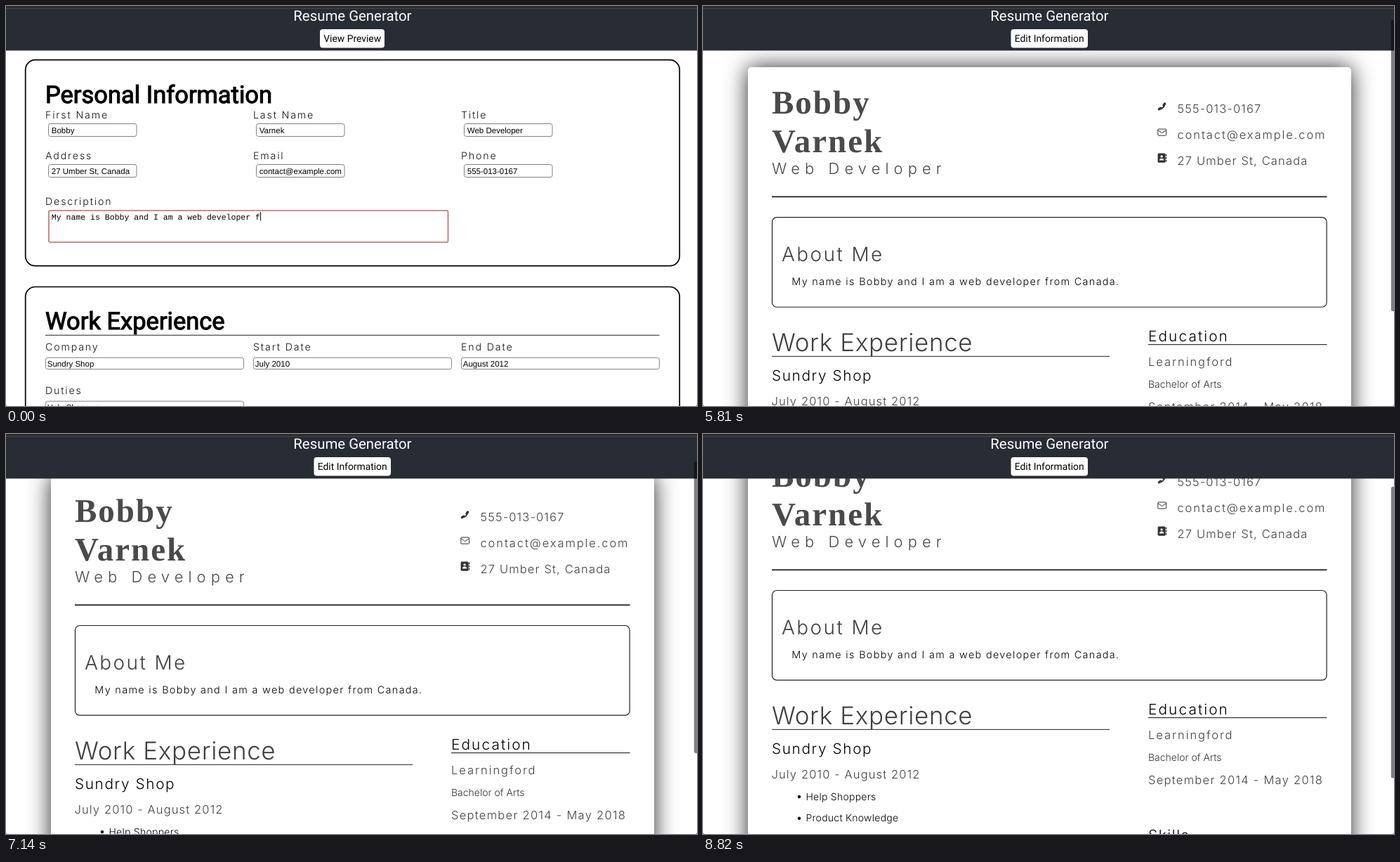
An HTML page that plays this animation: 984 by 569 pixels, repeating every 8.89 s.

```html
<!DOCTYPE html>
<html lang="en">
<head>
<meta charset="utf-8">
<title>Resume Generator</title>
<style>
html, body { margin: 0; width: 100%; height: 100%; overflow: hidden; background: #fff; }
#stage { position: fixed; inset: 0; overflow: hidden; contain: strict; }
#sheet {
  position: absolute; left: 63.5px; top: 89.5px; width: 859.5px; height: 640px;
  border-radius: 5px; background: #fff; box-shadow: 0 0 32px rgba(0, 0, 0, .85);
}
svg { position: absolute; left: 0; top: 0; width: 984px; height: 569px; overflow: hidden; }
text { text-rendering: geometricPrecision; font-family: Inter, "Open Sans", sans-serif; white-space: pre; }
.bar { font-family: Roboto, sans-serif; text-anchor: middle; }
.head { font: 34.5px Roboto, sans-serif; stroke: #000; stroke-width: 1.1px; }
.label { font-size: 14.2px; font-weight: 350; letter-spacing: 1.85px; fill: #111; }
.value { font: 11.5px "Liberation Sans", Arial, sans-serif; }
.mono { font: 11.53px "Liberation Mono", "Courier New", monospace; }
.name { font: bold 47px "Liberation Serif", serif; letter-spacing: 2px; fill: #4a4a4a; }
.job { font-size: 22px; font-weight: 300; fill: #484848; }
.light { font-size: 16.5px; font-weight: 300; fill: #404040; }
.about { font-size: 28px; font-weight: 300; fill: #404040; }
.big { font-size: 35px; font-weight: 300; fill: #404040; }
.sub { font-size: 20.8px; font-weight: 350; }
.body { font-size: 14.4px; font-weight: 350; }
.small { font-size: 14px; font-weight: 350; }
.dim { font-size: 14px; font-weight: 300; fill: #303030; }
</style>
</head>
<body>
<div id="stage">
  <div id="sheet"></div>
  <svg viewBox="0 0 984 569">
    <g id="form"></g>
    <g id="resume"></g>
    <g id="top"></g>
  </svg>
</div>
<script>
const $ = id => document.getElementById(id);
const form = $('form'), resume = $('resume'), bar = $('top'), sheet = $('sheet');

function add(parent, tag, attrs) {
  const el = document.createElementNS('http://www.w3.org/2000/svg', tag);
  for (const k in attrs) el.setAttribute(k, attrs[k]);
  return parent.appendChild(el);
}
function text(parent, cls, x, y, str, spacing) {
  const el = add(parent, 'text', { class: cls, x, y });
  if (spacing) el.style.letterSpacing = spacing + 'px';
  el.textContent = str;
  return el;
}
function box(parent, x, y, width, height, rx, stroke, weight = 1, fill = 'none') {
  return add(parent, 'rect', { x, y, width, height, rx, stroke, 'stroke-width': weight, fill });
}
function rule(parent, x, y, width, height, fill) {
  return add(parent, 'rect', { x, y, width, height, fill });
}

const LOOP = 8890, STEP = 70, SWITCH = 3990, BLUR = 3850;
const COLS = [56, 352, 648], GREY = '#808080';
const BIO = 'My name is Bobby and I am a web developer from Canada.';
const PHONE = '555-013-0167', EMAIL = 'contact@example.com', ADDRESS = '27 Umber St, Canada';

// Edit form
function field(col, y, label, value) {
  text(form, 'label', COLS[col], y, label);
  box(form, COLS[col] + 4.5, y + 8, 125.5, 18, 3, GREY);
  text(form, 'value', COLS[col] + 8.8, y + 21, value);
}
function wideField(col, y, label, value) {
  text(form, 'label', COLS[col], y, label);
  box(form, COLS[col] + .4, y + 10.7, 282, 16.4, 3, GREY);
  text(form, 'value', COLS[col] + 2.8, y + 23, value);
}
box(form, 27.7, 76.7, 931.5, 293, 14, '#000', 1.7);
box(form, 27.7, 399.5, 931.5, 400, 14, '#000', 1.7);
text(form, 'head', 56, 137.5, 'Personal Information');
field(0, 159.5, 'First Name', 'Bobby');
field(1, 159.5, 'Last Name', 'Varnek');
field(2, 159.5, 'Title', 'Web Developer');
field(0, 217.5, 'Address', ADDRESS);
field(1, 217.5, 'Email', EMAIL);
field(2, 217.5, 'Phone', PHONE);
text(form, 'label', 56, 282.5, 'Description');
const ring = box(form, 61, 291, 568.5, 45, 2, '#c46a68', 1.6);
const typed = text(form, 'mono', 64.8, 303.7, '');
const caret = rule(form, 0, 293, 1, 12.5, '#000');
text(form, 'head', 56, 460, 'Work Experience');
rule(form, 56, 467.7, 874.5, 1.3, '#555');
wideField(0, 489.5, 'Company', 'Sundry Shop');
wideField(1, 489.5, 'Start Date', 'July 2010');
wideField(2, 489.5, 'End Date', 'August 2012');
wideField(0, 551.5, 'Duties', 'Help Shoppers');

// Resume preview
text(resume, 'name', 98, 155.5, 'Bobby');
text(resume, 'name', 98, 211, 'Varnek');
text(resume, 'job', 98, 241.5, 'Web Developer', 7.05);
text(resume, 'light', 675.5, 154.5, PHONE, 1.15);
text(resume, 'light', 675.5, 191.5, EMAIL, 1.9);
text(resume, 'light', 675.5, 228.5, ADDRESS, 1.15);
rule(resume, 98, 273.4, 790.5, 1.8, '#222');

const ink = '#333';
add(resume, 'path', { d: 'M649.5 149.6Q656.8 149 657.4 142', fill: 'none', stroke: ink, 'stroke-width': 2 });
add(resume, 'path', { d: 'M649.4 149.6l2.4-1.4M656 144.2l1.6-2.2', stroke: ink, 'stroke-width': 3.4, 'stroke-linecap': 'round' });
box(resume, 647.8, 178, 11.8, 9.2, 1, ink);
add(resume, 'path', { d: 'M648 179.6l5.7 4 5.7-4', fill: 'none', stroke: ink });
box(resume, 647.6, 212.4, 11, 13.4, 1.5, 'none', 0, ink);
for (let i = 0; i < 3; i++) rule(resume, 659, 213.8 + i * 4, 1.3, 2.6, ink);
add(resume, 'circle', { cx: 653.1, cy: 216.9, r: 1.7, fill: '#fff' });
add(resume, 'path', { d: 'M650 222.4q0-2.8 3.1-2.8t3.1 2.8z', fill: '#fff' });

box(resume, 98.5, 303.5, 789.6, 127.7, 6.5, '#222', 1.2);
text(resume, 'about', 112, 365.7, 'About Me', 2.4);
text(resume, 'body', 126.3, 400, BIO, 1.33);
text(resume, 'big', 98, 493.5, 'Work Experience', .65);
rule(resume, 98, 500.8, 481, 1.2, '#444');
text(resume, 'sub', 98, 536, 'Sundry Shop', 1.6);
text(resume, 'light', 97.5, 570.7, 'July 2010 - August 2012', 1.13);
['Help Shoppers', 'Product Knowledge'].forEach((duty, i) => {
  const y = 601.6 + i * 30.7;
  add(resume, 'circle', { cx: 137, cy: y - 4.6, r: 2.2 });
  text(resume, 'small', 146.5, y, duty, .25);
});
text(resume, 'sub', 634, 479.5, 'Education', 2.1);
rule(resume, 634, 484, 254.5, 1.1, '#222');
text(resume, 'light', 634, 515, 'Learningford', 1.95);
text(resume, 'dim', 634, 546, 'Bachelor of Arts');
text(resume, 'light', 634, 578.7, 'September 2014 - May 2018', 1.28);
text(resume, 'sub', 634, 659, 'Skills', 1.6);

// Header and window edges
rule(bar, 0, 0, 984, 63.4, '#282c34');
rule(bar, 0, 0, 984, 2.6, '#292929');
rule(bar, 0, 2.6, 984, 1.4, '#454545');
text(bar, 'bar', 493.4, 20.6, 'Resume Generator').setAttribute('style', 'font-size:20.4px;fill:#fff');
const button = box(bar, 447, 33, 92, 26.5, 4, 'none', 0, '#fff');
const caption = text(bar, 'bar', 493.2, 51.2, '');
caption.style.fontSize = '13.87px';
const thumb = box(bar, 979.8, 0, 6, 414.5, 2.5, 'none', 0, 'rgba(0,0,0,.5)');
add(bar, 'path', { d: 'M0 566.5Q0 569 2.5 569H0ZM984 566.5Q984 569 981.5 569H984Z', fill: '#555' });

// Moments at which one more character appears
const KEYS = [70, 210, 280, 490, 840, 1190, 1330, 1540, 1680, 1750, 2310];
const SCROLL = [
  [5740, 0], [6090, 14.7], [6300, 20.5], [6510, 20.5], [6650, 24.5], [6720, 24.5],
  [6790, 26], [6930, 26], [7140, 31], [7420, 31], [7490, 33], [7630, 33],
  [8050, 46.6], [8540, 62.5], [8820, 81]
];

function scrollAt(t) {
  if (t <= SCROLL[0][0]) return 0;
  for (let i = 1; i < SCROLL.length; i++) {
    const [t0, a] = SCROLL[i - 1], [t1, b] = SCROLL[i];
    if (t <= t1) return a + (b - a) * (t - t0) / (t1 - t0);
  }
  return SCROLL[SCROLL.length - 1][1];
}
function show(el, on) { el.style.display = on ? '' : 'none'; }

function draw(t) {
  const preview = t >= SWITCH;
  show(form, !preview);
  show(resume, preview);
  show(sheet, preview);
  show(thumb, t >= 5810);
  caption.textContent = preview ? 'Edit Information' : 'View Preview';
  button.setAttribute('x', preview ? 438.5 : 447);
  button.setAttribute('width', preview ? 109.5 : 92);

  if (preview) {
    const y = scrollAt(t);
    resume.setAttribute('transform', `translate(0 ${-y})`);
    sheet.style.transform = `translateY(${-y}px)`;
    thumb.setAttribute('y', 17.6 + y * .71);
  } else {
    const n = BIO.length - KEYS.length + KEYS.filter(k => t >= k).length;
    const focus = t < BLUR;
    typed.textContent = BIO.slice(0, n);
    caret.setAttribute('x', 64.5 + n * 6.92);
    show(caret, focus && !(t >= 2800 && t < 3360));
    ring.setAttribute('stroke', focus ? '#c46a68' : GREY);
    ring.setAttribute('stroke-width', focus ? 1.6 : 1);
  }
}

const start = performance.now();
function tick() {
  const t = Math.max(0, performance.now() - start) % LOOP;
  draw(Math.floor(t / STEP) * STEP);
  requestAnimationFrame(tick);
}
tick();
</script>
</body>
</html>
```
